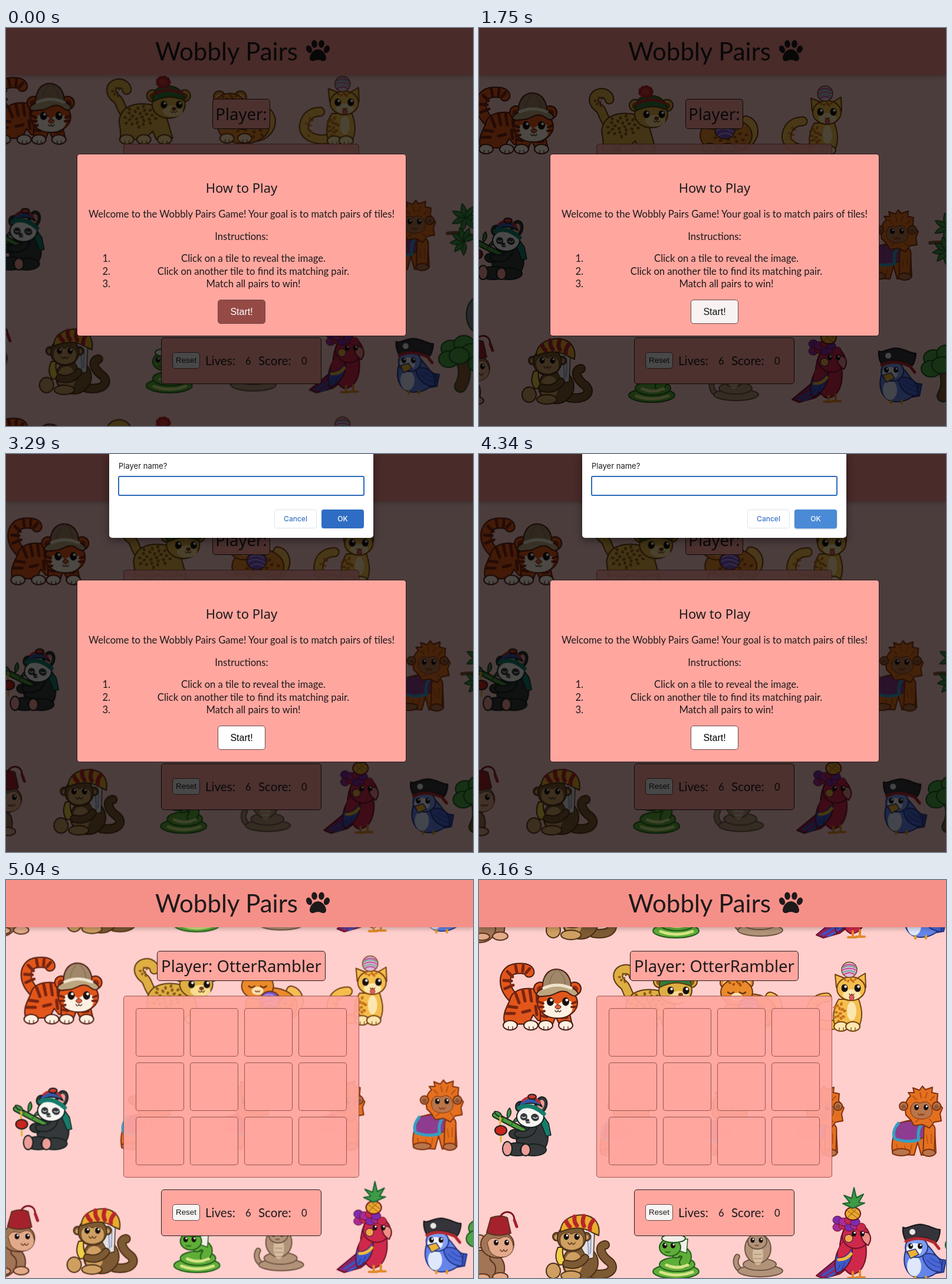
Write an HTML page with a canvas that moves like this. It is 792 by 674 pixels and loops after 6230 ms.

```html
<!DOCTYPE html>
<html lang="en">
<head>
<meta charset="utf-8">
<title>Wobbly Pairs</title>
<style>
html, body { margin: 0; width: 100%; height: 100%; overflow: hidden; background: #ffcfcd; }
#stage { position: relative; width: 792px; height: 674px; overflow: hidden; color: #1e1a1a; font: 16.6px Lato, sans-serif; }
#stage * { box-sizing: border-box; }
#stage canvas, #stage div { position: absolute; }
.box { background: #ffa69f; border: 1px solid #2a1a18; border-radius: 5px; }
.faint { background: rgba(255, 166, 159, .92); border-color: rgba(90, 30, 25, .6); }
.text { text-align: center; white-space: nowrap; height: 40px; line-height: 40px; }
.sans { font-family: "Noto Sans", sans-serif; }
.ui { font: 13px/40px Inter, sans-serif; }
.btn { font-family: "Liberation Sans", Arial, sans-serif; text-align: center; border: 1px solid #6d4a47; border-radius: 5px; }
#header { left: 0; top: 0; width: 792px; height: 80px; background: #f59089; box-shadow: 0 3px 7px rgba(0, 0, 0, .22); }
#header .text { left: 224px; top: 19px; width: 300px; font-size: 42px; }
#player { top: 120px; height: 51px; line-height: 49px; font-size: 27.5px; text-align: center; white-space: nowrap; }
#shade { left: 0; top: 0; width: 792px; height: 674px; background: rgba(0, 0, 0, .7); }
#modal { left: 120px; top: 213px; width: 559px; height: 309px; }
#modal .text { left: 0; width: 557px; }
#start { left: 238px; top: 246px; width: 81px; height: 41px; line-height: 39px; font-size: 16px; }
#prompt { left: 175px; top: 0; width: 448px; height: 142px; background: #fff; border-radius: 0 0 5px 5px; box-shadow: 0 4px 14px rgba(0, 0, 0, .45); }
#field { left: 15px; top: 37px; width: 418px; height: 34px; border: 2px solid #2f6bb8; border-radius: 3px; line-height: 30px; padding-left: 8px; }
#caret { left: 24px; top: 46px; width: 1px; height: 15px; background: #111; }
.choice { top: 94px; width: 72px; height: 32px; border-radius: 4px; text-align: center; font: 500 12px/30px Inter, sans-serif; }
</style>
</head>
<body>
<div id="stage">
  <canvas id="bg" width="792" height="674"></canvas>
  <div id="header">
    <div class="text">Wobbly Pairs</div>
    <canvas id="paw" width="44" height="40" style="left:507px;top:18px"></canvas>
  </div>
  <div id="player" class="box sans"></div>
  <div id="board" class="box faint" style="left:199px;top:196px;width:400px;height:308px"></div>
  <div class="box" style="left:263px;top:524px;width:272px;height:79px">
    <div class="btn" style="left:18px;top:24px;width:47px;height:28px;font-size:13.33px;line-height:26px;background:#f7f4f3">Reset</div>
    <div class="text" style="left:74px;top:18px;font-size:20.6px">Lives:</div>
    <div class="text" style="left:142px;top:19px">6</div>
    <div class="text" style="left:164px;top:18px;font-size:20.6px">Score:</div>
    <div class="text" style="left:237px;top:19px">0</div>
  </div>
  <div id="shade"></div>
  <div id="modal" class="box">
    <div class="text sans" style="top:36px;font-size:22px">How to Play</div>
    <div class="text" style="top:81px">Welcome to the Wobbly Pairs Game! Your goal is to match pairs of tiles!</div>
    <div class="text" style="top:119px">Instructions:</div>
    <div id="start" class="btn">Start!</div>
  </div>
  <div id="prompt">
    <div class="ui" style="left:16px;top:0;white-space:nowrap">Player name?</div>
    <div id="field" class="ui"></div>
    <div id="caret"></div>
    <div class="choice" style="left:280px;border:1px solid #dfe3ea;color:#3a74c6">Cancel</div>
    <div id="ok" class="choice" style="left:360px;line-height:32px;color:#fff">OK</div>
  </div>
</div>
<script>
const LOOP = 6230, STEP = 70, SPEED = 0.0093;
const OPEN = 2660, CLOSE = 4480, TILE = 577, TOP = 120, HOME = 57.3;
const NAME = 'OtterRambler';
const $ = id => document.getElementById(id);

// ---- static markup built from rules
['Click on a tile to reveal the image.', 'Click on another tile to find its matching pair.', 'Match all pairs to win!'].forEach((s, i) => {
  const y = 156 + i * 21.6;
  $('modal').insertAdjacentHTML('beforeend',
    `<div class="text" style="top:${y}px;left:20px">${s}</div><div class="text" style="top:${y}px;left:auto;right:501px;width:auto">${i + 1}.</div>`);
});
for (let i = 0; i < 12; i++) {
  const x = 20 + i % 4 * 92, y = 20 + (i >> 2) * 92;
  $('board').insertAdjacentHTML('beforeend', `<div class="box faint" style="left:${x}px;top:${y}px;width:82px;height:82px"></div>`);
}

// ---- drawing helpers
const sheet = document.createElement('canvas');
sheet.width = 900;
sheet.height = 580;
let g = sheet.getContext('2d'), ink = '#3b1a10';
g.translate(0, -TOP);
g.lineCap = g.lineJoin = 'round';

function oval(x, y, rx, ry, fill, rot = 0, line = 2) {
  g.beginPath();
  g.ellipse(x, y, rx, ry, rot, 0, 7);
  g.fillStyle = fill;
  g.fill();
  if (line) { g.strokeStyle = ink; g.lineWidth = line; g.stroke(); }
}
function shape(d, fill, line = 2) {
  const p = new Path2D(d);
  g.fillStyle = fill;
  g.fill(p);
  if (line) { g.strokeStyle = ink; g.lineWidth = line; g.stroke(p); }
}
function stroke(d, color, w) {
  g.strokeStyle = color;
  g.lineWidth = w;
  g.stroke(new Path2D(d));
}
function tube(d, color, w) {
  stroke(d, ink, w + 4);
  stroke(d, color, w);
}
function feet(color, y, ...xs) {
  xs.forEach(x => {
    oval(x, y, 12, 8, color);
    stroke(`M${x - 3},${y + 2}v5M${x + 4},${y + 2}v5`, ink, 1.2);
  });
}
function eyes(x, y, gap, r = 5) {
  [x - gap, x + gap].forEach(ex => {
    oval(ex, y, r, r * 1.2, '#18100e', 0, 0);
    oval(ex + r * .3, y - r * .45, r * .4, r * .4, '#fff', 0, 0);
  });
}
function smile(x, y, w = 5) {
  stroke(`M${x - w},${y}q${w / 2},${w} ${w},0q${w / 2},${w} ${w},0`, ink, 1.5);
}
function spots(x, y, rx, ry, n, color, size = 3) {
  for (let i = 0; i < n; i++) {
    const a = i * 2.4, r = Math.sqrt((i + .5) / n) * .85;
    oval(x + Math.cos(a) * r * rx, y + Math.sin(a) * r * ry, size, size * .75, color, a, 0);
  }
}
function ears(x, y, gap, r, outer, inner) {
  [x - gap, x + gap].forEach(ex => {
    oval(ex, y, r, r, outer);
    oval(ex, y + 1, r * .55, r * .55, inner, 0, 0);
  });
}

// ---- animals
function tiger() {
  ink = '#4a1a10';
  const c = '#e2561b', dark = '#7a2410', pale = '#fff1e2';
  tube('M64,204C38,186 38,152 64,150C76,149 84,151 85,156', c, 15);
  stroke('M44,184l14,-6M42,170l13,1M48,155l9,9M62,145l2,11M75,145l-1,10M86,150l-6,7', dark, 5);
  shape('M52,204C56,182 88,178 112,192L122,238L100,238L92,228L84,244L44,244C38,228 48,214 52,204Z', c);
  stroke('M62,192l6,16M74,186l4,19M86,185l3,20M98,188l1,18M49,214l15,2M46,226l14,0M74,224l12,-3M96,214l2,14', dark, 5);
  shape('M104,220L104,246L124,246L130,232L138,247L158,245L152,218Z', c);
  stroke('M106,230l9,2M140,234l10,-1', dark, 4);
  feet(pale, 246, 53, 88, 113, 147);
  ears(133, 184, 29, 11, c, '#8c2b17');
  oval(133, 208, 34, 26, c);
  shape('M110,206Q122,200 133,212Q144,200 157,206Q164,226 144,232Q120,236 108,224Z', pale, 0);
  stroke('M100,206l9,3M101,215l8,0M104,224l7,-2M166,206l-8,3M165,215l-8,0', dark, 4);
  eyes(134, 206, 13, 6);
  oval(134, 215, 5, 3.5, '#d9603f', 0, 1);
  smile(134, 221);
  shape('M108,186C106,160 120,151 132,151C148,152 158,166 156,188Z', '#a0876a');
  stroke('M132,152Q120,162 119,180M133,152Q146,162 146,178', '#8a7052', 1.5);
  shape('M97,194C102,176 160,172 168,192C164,200 156,195 150,190C136,184 128,196 118,196C108,196 104,200 97,194Z', '#bca680');
  stroke('M110,183Q132,173 156,183', '#efe3cd', 5);
}
function leopard() {
  ink = '#5a3812';
  const c = '#dfae42', pale = '#f7dc92';
  tube('M262,206C250,192 252,184 246,178C230,166 234,152 249,151C256,151 262,156 262,162', c, 13);
  shape('M252,204C262,182 300,180 326,196L340,244L312,246L306,232L292,246L250,246C256,230 244,218 252,204Z', c);
  spots(284, 208, 34, 22, 24, '#8a5a1c');
  spots(244, 166, 8, 12, 6, '#8a5a1c', 2.5);
  feet(pale, 246, 262, 291, 326);
  ears(333, 172, 27, 10, c, '#8a5a1c');
  oval(333, 187, 28, 23, c);
  oval(340, 198, 17, 10, pale, 0, 0);
  eyes(338, 187, 13, 5.5);
  oval(342, 194, 4, 3, '#7a3b1c', 0, 0);
  smile(342, 198);
  shape('M306,182C305,160 318,155 330,155C346,155 360,164 360,180C340,171 324,173 306,182Z', '#2f7d38');
  stroke('M308,170Q330,156 356,168', '#b8292a', 5);
  for (let a = 0; a < 6.2; a += .7) oval(324 + Math.cos(a) * 8, 149 + Math.sin(a) * 6, 5, 5, '#b8242a', 0, 0);
  oval(324, 149, 7, 6, '#d23a36', 0, 0);
}
function jaguar() {
  ink = '#6b3410';
  const c = '#ea8a2a';
  tube('M476,242C510,240 514,204 494,198', '#f5bd55', 14);
  oval(460, 223, 44, 30, c);
  spots(470, 226, 34, 24, 18, '#9a4a14');
  ears(437, 174, 18, 10, c, '#f9c98a');
  oval(437, 190, 27, 22, c);
  spots(437, 175, 16, 6, 6, '#9a4a14', 2.5);
  stroke('M422,190q5,5 10,0M442,190q5,5 10,0', ink, 2.5);
  oval(437, 198, 10, 7, '#fde2b4', 0, 0);
  smile(437, 198, 4);
  oval(458, 214, 17, 15, '#7a52c7');
  stroke('M446,208q12,-8 24,2M444,215q12,-8 28,2M448,223q10,-8 22,0', '#b9a0ee', 2);
  feet('#fde2b4', 244, 432, 462);
}
function cat() {
  ink = '#74400f';
  const c = '#f4bd4c', pale = '#fde6ae';
  tube('M606,244C588,250 558,242 563,220C566,206 576,199 590,199', c, 13);
  spots(572, 222, 8, 22, 7, '#d67a1e', 2.5);
  shape('M610,202C598,220 598,250 612,253L642,253C654,232 648,214 644,202Z', c);
  spots(611, 226, 11, 24, 14, '#c9701a');
  oval(632, 222, 8, 16, pale, 0, 0);
  feet(pale, 248, 614, 634);
  shape('M606,182L604,160L622,167ZM640,167L655,158L656,182Z', c);
  oval(631, 184, 24, 20, c);
  oval(632, 194, 15, 9, pale, 0, 0);
  spots(630, 170, 12, 4, 6, '#c9701a', 2.5);
  eyes(631, 183, 11, 5.5);
  oval(632, 199, 4, 5, '#e4566b', 0, 1);
  smile(632, 193, 4);
  oval(628, 152, 13, 13, '#dcbcd6', 0, 1.5);
  stroke('M618,146q10,-6 20,0M616,153q12,-7 24,0M619,160q9,-6 18,0', '#c2479b', 2);
  stroke('M617,149q11,-7 22,0M617,157q11,-7 22,0', '#4bab78', 1.5);
}
function panda() {
  ink = '#16201e';
  const k = '#35383a', pink = '#ee9d97';
  oval(90, 436, 27, 30, k);
  shape('M108,398L118,412L122,432L114,434L105,412Z', '#177c6b', 1.5);
  oval(65, 456, 22, 11, k);
  oval(92, 457, 22, 10, k);
  oval(48, 455, 8, 12, pink);
  oval(79, 457, 8, 10, pink);
  tube('M27,398L76,424', '#4c9a3c', 6);
  stroke('M42,403l-3,6M57,411l-3,6', '#2f6d25', 2);
  shape('M48,404Q46,390 52,386Q58,396 48,404ZM40,402Q28,400 26,392Q36,390 40,402ZM58,409Q64,398 72,402Q68,410 58,409Z', '#3f9140', 1.5);
  oval(62, 430, 11, 8, k);
  tube('M92,420Q86,434 66,430', k, 9);
  oval(70, 384, 8, 9, k);
  oval(105, 381, 10, 14, k, .3);
  oval(105, 381, 5.5, 9, pink, .3, 0);
  oval(87, 401, 23, 18, '#f7f5f2');
  oval(76, 401, 6, 6, k, -.5, 0);
  oval(95, 402, 7, 6, k, .5, 0);
  stroke('M73,401q3,3 6,0M92,402q4,3 7,0', '#fff', 1.2);
  oval(82, 407, 3.5, 2.5, k, 0, 0);
  smile(83, 410, 3);
  shape('M67,385C69,366 98,364 107,384C94,376 80,376 67,385Z', '#3457a8');
  stroke('M68,386Q88,376 110,396', '#177c6b', 7);
  stroke('M74,374q5,-5 9,-5M96,370l7,7', '#b8302f', 4);
  oval(90, 367, 7, 4, '#cf3832');
  stroke('M36,402v14M37,432v11', '#e3b13a', 3);
  oval(37, 424, 10, 8, '#c9241e');
}
function ape(dx) {
  g.save();
  g.translate(dx, 0);
  ink = '#7d3010';
  const c = '#e4701f', skin = '#b9754a', hair = '#b94d14';
  shape('M706,422C708,404 768,398 773,424L775,462L750,466L744,444L738,466L702,464C698,450 702,436 706,422Z', c);
  stroke('M708,448l3,12M722,450l2,10M734,448l-2,10', hair, 1.5);
  shape('M711,412Q735,404 758,412L760,432L746,440Q722,446 702,438Z', '#8e3c90');
  stroke('M711,412Q700,426 705,438Q726,446 746,440Q742,424 752,412', '#359fc4', 5);
  oval(716, 461, 15, 6, skin);
  tube('M764,422L763,456', c, 17);
  stroke('M759,432l2,14M767,430l0,16', hair, 1.5);
  oval(763, 462, 11, 6, skin);
  shape('M724,398Q720,374 732,366L728,360L738,360L736,352L747,356L752,349L757,355L769,351L768,360L778,362L777,374L786,386L782,396L784,408L772,410L764,420L752,414L738,416L732,406Z', c);
  stroke('M736,366l6,6M748,360l2,9M760,360l-3,9M772,366l-6,7M740,410l5,-4M768,410l-4,-5', hair, 2);
  ears(748, 383, 28, 7, skin, '#8f5532');
  shape('M732,386Q736,372 748,378Q762,370 768,386Q772,404 750,405Q730,404 732,386Z', skin, 1);
  eyes(750, 385, 8, 4);
  smile(750, 396, 5);
  g.restore();
}
function fezMonkey() {
  ink = '#5a3420';
  const c = '#a27556', skin = '#e3aa8a';
  oval(2, 655, 28, 28, c, .3);
  tube('M26,640Q40,650 34,668', c, 13);
  oval(36, 672, 13, 7, skin);
  oval(6, 673, 12, 6, skin);
  oval(2, 612, 9, 11, skin);
  oval(31, 617, 28, 23, c);
  shape('M14,614Q20,602 34,608Q50,598 56,612Q64,630 46,638Q26,642 18,628Z', skin, 1);
  eyes(38, 614, 9, 4);
  smile(42, 626, 6);
  shape('M13,597L20,572Q36,566 48,572L54,598Q32,606 13,597Z', '#a5222c');
  stroke('M36,570C42,558 60,560 60,576', '#7d1720', 3);
  stroke('M60,576l4,11', '#a5222c', 5);
}
function turbanMonkey() {
  ink = '#4a2f14';
  const c = '#7d5a34', skin = '#cf9f62';
  tube('M194,667C226,672 234,654 218,644C206,634 202,620 214,618', c, 12);
  oval(172, 648, 30, 29, c);
  oval(160, 650, 15, 20, skin, 0, 0);
  shape('M176,588L196,594L194,640L184,642L174,624Z', '#e4e0e4', 1.5);
  stroke('M184,600l2,34M190,602l-1,30', '#8f9cc0', 2);
  ears(157, 604, 25, 7, c, skin);
  oval(157, 606, 24, 23, c);
  shape('M138,604Q146,592 157,600Q168,592 176,604Q182,624 158,627Q134,626 138,604Z', skin, 1);
  eyes(157, 604, 9, 4.5);
  smile(157, 614, 6);
  shape('M138,596C138,576 156,567 176,567C198,569 206,584 203,602L194,598C176,586 156,588 138,596Z', '#e9ac2c');
  stroke('M148,578q2,6 6,9M162,570q-1,10 4,15M178,569q-4,10 0,17M194,576q-7,8 -6,16', '#b8262b', 7);
  shape('M134,622Q126,640 136,652L150,650Q140,640 142,622Z', '#f0cf48');
  tube('M180,640Q168,656 148,650', c, 10);
  oval(126, 662, 12, 13, skin);
  oval(156, 670, 17, 8, skin);
}
function snakes() {
  ink = '#235c1c';
  const c = '#5fae38';
  oval(334, 663, 39, 12, c);
  oval(336, 651, 30, 12, c);
  tube('M348,648C360,632 342,624 334,632', c, 14);
  stroke('M308,664q26,10 54,0M318,652q18,8 36,0', '#d7e487', 5);
  shape('M332,610L354,608L352,632L340,628Z', '#f1eee9', 1.5);
  oval(324, 622, 18, 15, c);
  eyes(322, 619, 7, 4);
  smile(320, 629, 4);
  oval(330, 607, 20, 7, '#f1eee9');
  ink = '#6e5543';
  const d = '#b29379';
  tube('M446,662C434,656 434,644 438,638', d, 6);
  oval(477, 662, 38, 10, d);
  oval(476, 651, 28, 10, d);
  oval(473, 624, 22, 25, d);
  oval(473, 634, 9, 18, '#d6bd9f', 0, 0);
  stroke('M467,634h12M467,641h12M468,648h10', d, 1.5);
  oval(472, 612, 16, 13, d);
  eyes(471, 610, 7, 3.5);
  smile(471, 618, 3);
}
function parrot() {
  ink = '#6a1226';
  const c = '#d0284a';
  shape('M618,632L572,670L584,675L612,667L632,652Z', '#8d2468');
  stroke('M584,669L614,650M592,672L618,658', '#3a55c4', 4);
  shape('M618,594C606,622 612,662 632,668C652,666 662,640 654,606Z', c);
  shape('M618,614C602,632 602,652 606,666C628,658 636,638 632,618Z', '#3f58c9');
  shape('M618,612C608,622 607,632 609,640Q624,640 633,622Z', c, 1);
  stroke('M610,643q14,0 21,-10', '#f2bc37', 5);
  stroke('M612,652l-4,9M620,648l-6,14', '#2b3f96', 1.5);
  stroke('M634,664v9M646,662v10M626,674h14M640,673h14', '#e08a2a', 4);
  oval(639, 603, 23, 21, c);
  shape('M648,598C664,592 668,606 660,619C656,616 648,612 648,598Z', '#ec8f86');
  oval(627, 607, 9, 9, '#c23a86', 0, 0);
  oval(627, 607, 7, 7, '#f0a84a', 0, 1.5);
  eyes(643, 599, 7, 4);
  for (let i = 0; i < 9; i++) oval(608 + i % 5 * 10, 588 - (i > 4 ? 9 : 0) - i % 2 * 3, 8, 7, ['#a52c9a', '#c8284e', '#7b2bb0'][i % 3], 0, 1);
  oval(634, 565, 13, 11, '#e8a92e');
  stroke('M625,560l16,12M640,557l-14,14M629,556l17,12', '#b36b18', 1.2);
  ink = '#1f6331';
  shape('M634,556L617,548L629,546L619,534L632,539L636,521L640,538L652,532L644,546L654,547Z', '#3d9a45');
}
function bluebird() {
  ink = '#25367f';
  shape('M766,640L792,644L788,664L764,668Z', '#3a55c4');
  shape('M724,626C716,652 726,673 748,674C772,674 786,660 786,644C772,640 768,616 746,610Z', '#6484ea');
  oval(738, 654, 12, 17, '#dfe8fb', 0, 0);
  shape('M752,634C774,628 788,642 784,664C768,664 754,654 752,634Z', '#4a67d6');
  stroke('M760,644q10,10 22,12M766,640q8,8 18,9', '#2f49b0', 1.5);
  oval(742, 622, 19, 17, '#7f9cf2');
  oval(738, 626, 13, 11, '#eef2fd', 0, 0);
  eyes(740, 620, 8, 4);
  shape('M726,629L740,625L746,634L732,641Z', '#eeb132', 1.5);
  stroke('M740,672v4M758,672v4', '#e09a2a', 4);
  ink = '#17161a';
  shape('M719,588C726,592 732,584 748,583C764,584 772,592 782,592C782,602 778,612 774,614C758,602 742,602 724,611C720,604 718,596 719,588Z', '#35343a');
  stroke('M724,612Q746,601 772,614l8,10', '#b0292f', 5);
  oval(735, 596, 5, 5, '#e9e7e4', 0, 0);
}
function foliage() {
  ink = '#1f5226';
  const leaf = (x, y, a) => {
    g.save();
    g.translate(x, y);
    g.rotate(a);
    shape('M0,0Q10,-9 24,0Q10,9 0,0Z', '#3f9648', 1.5);
    g.restore();
  };
  stroke('M806,405Q840,400 870,420', '#8a5a34', 6);
  for (let i = 0; i < 7; i++) {
    leaf(836, 378, i * .9);
    leaf(834, 418, 1.6 + i * .7);
  }
  tube('M826,610Q842,640 828,664', '#8b5c36', 18);
  [[812, 600], [834, 592], [808, 618], [846, 606], [826, 612], [858, 626]].forEach(([x, y]) => oval(x, y, 17, 14, '#4ca546'));
  oval(858, 543, 20, 30, '#85868c');
}
[tiger, leopard, jaguar, cat, panda, fezMonkey, turbanMonkey, snakes, parrot, bluebird, foliage].forEach(f => f());
[-495, -328, -167, 0].forEach(ape);

// ---- paw beside the title
g = $('paw').getContext('2d');
[[7, 18, -.4], [16, 9, -.1], [28, 9, .1], [37, 18, .4]].forEach(([x, y, a]) => oval(x, y, 4.8, 6.6, '#1e1a1a', a, 0));
shape('M22,18C30,18 36,27 36,33C36,38 31,39 27,37Q22,35 17,37C13,39 8,38 8,33C8,27 14,18 22,18Z', '#1e1a1a', 0);

// ---- timeline
const screen = $('bg').getContext('2d');
const clamp = v => Math.max(0, Math.min(1, v));
const mix = (a, b, k) => `rgb(${a.map((v, i) => Math.round(v + (b[i] - v) * k))})`;

function render(t) {
  const playing = t >= CLOSE;
  const held = t >= OPEN && !playing;
  const shift = (held ? OPEN - 25 : t) * SPEED - HOME;
  screen.fillStyle = '#ffcfcd';
  screen.fillRect(0, 0, 792, 674);
  [-TILE, 0, TILE].forEach(y => screen.drawImage(sheet, shift, TOP + shift + y));

  $('shade').style.display = $('modal').style.display = playing ? 'none' : 'block';
  const p = $('player');
  p.textContent = playing ? 'Player: ' + NAME : 'Player:';
  p.style.left = playing ? '256px' : '350px';
  p.style.width = playing ? '286px' : '98px';

  const k = 1 - (1 - clamp((t - 1500) / 340)) ** 2;
  $('start').style.background = mix([150, 74, 69], [255, 255, 255], k);
  $('start').style.color = mix([255, 255, 255], [0, 0, 0], k);

  const fade = playing ? 1 - (t - CLOSE + STEP) / 210 : (t - OPEN + STEP) / 210;
  $('prompt').style.opacity = clamp(fade);
  $('caret').style.display = t < 3290 ? 'block' : 'none';
  $('field').textContent = t >= 3500 && t < 4340 ? NAME : '';
  const hover = clamp((t - 3500) / 280);
  $('ok').style.background = t >= 4340 ? '#4a8ad6' : mix([47, 109, 196], [60, 124, 206], hover);
  $('ok').style.boxShadow = `0 1px 2px rgba(40, 80, 150, ${hover * .4})`;
}
function tick(now) {
  render(Math.floor(now % LOOP / STEP) * STEP);
  requestAnimationFrame(tick);
}
render(0);
requestAnimationFrame(tick);
</script>
</body>
</html>
```
